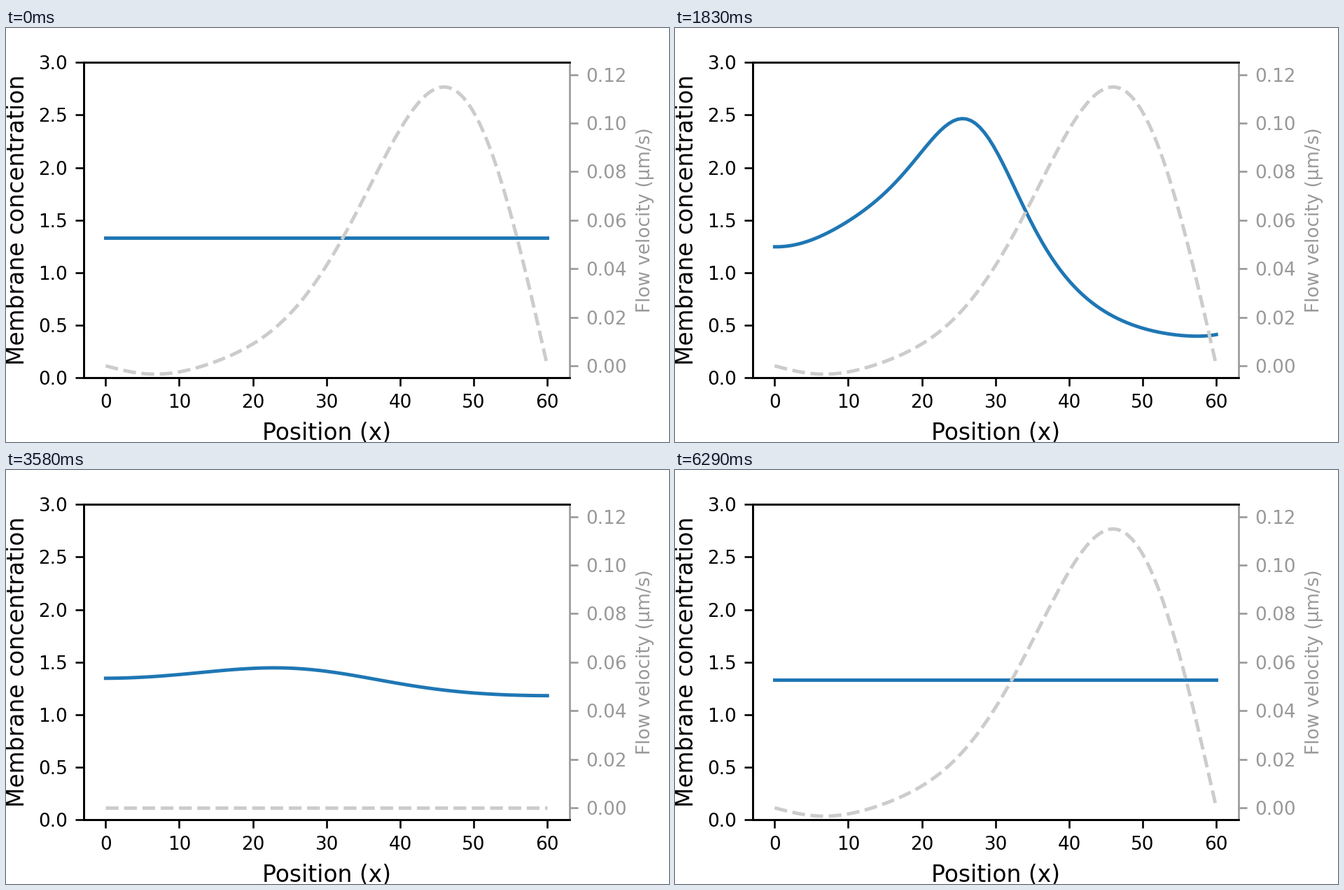
A matplotlib script for the animation above (6330 ms loop, 947 by 592 pixels).

```python
import numpy as np
import matplotlib.pyplot as plt
from matplotlib.animation import FuncAnimation

W, H = 947, 592
DPI = W / 4
LOOP_MS, FRAMES = 6330, 152

# Exchange, diffusion and flow on a 60 µm membrane with a shared cytoplasm
LENGTH, N = 60, 100
D, K_OFF, PSI, REST = 0.1, 0.005, 0.174, 4 / 3
K_ON = K_OFF * REST / (1 - PSI * REST)
SECONDS_PER_FRAME, DT = 10, 0.5
FLOW_END = 500

x = np.linspace(0, LENGTH, N)
dx = x[1] - x[0]


def flow_profile():
    """Flow speed in µm/s as a sine series, zero at both ends."""
    modes = [61.5, -56.4, 20.2, -5.35, -0.2, -0.12, -0.24]
    return sum(b * np.sin(n * np.pi * x / LENGTH)
               for n, b in enumerate(modes, 1)) / 1000


def step(conc, v):
    """One Euler step; the flow carries material to the left."""
    c = np.pad(conc, 1, mode="edge")
    flux = np.pad(v * conc, 1, mode="edge")
    diffusion = D * (c[2:] - 2 * conc + c[:-2]) / dx**2
    advection = (flux[2:] - flux[:-2]) / (2 * dx)
    exchange = K_ON * (1 - PSI * conc.mean()) - K_OFF * conc
    return conc + DT * (diffusion + advection + exchange)


def simulate():
    """All states of the loop; the last one returns to the start."""
    flow, still = flow_profile(), np.zeros(N)
    conc = np.full(N, REST)
    states = []
    for i in range(FRAMES - 1):
        v = flow if i * SECONDS_PER_FRAME < FLOW_END else still
        states.append((conc, v))
        for _ in range(int(SECONDS_PER_FRAME / DT)):
            conc = step(conc, v)
    return states + states[:1]


states = simulate()

plt.rcParams["font.family"] = "DejaVu Sans"
fig = plt.figure(figsize=(W / DPI, H / DPI), dpi=DPI, facecolor="white")
left, right, top, bottom = 110.8, 804.8, 49.2, 500.4
ax = fig.add_axes([left / W, 1 - bottom / H,
                   (right - left) / W, (bottom - top) / H])
ax.set_xlim(-3, 63)
ax.set_ylim(0, 3)
ax.set_xticks(range(0, 61, 10))
ax.set_yticks(np.arange(0, 3.1, 0.5))
ax.tick_params(labelsize=8)
ax.set_xlabel("Position (x)", fontsize=10)
ax.set_ylabel("Membrane concentration", fontsize=10)
ax.spines["right"].set_visible(False)
conc_line, = ax.plot(x, states[0][0], color="tab:blue", lw=1.5)

GREY = "0.6"
ax2 = ax.twinx()
ax2.set_xlim(-3, 63)
ax2.set_ylim(-0.005, 0.125)
ax2.set_yticks(np.arange(0, 0.121, 0.02))
ax2.tick_params(axis="y", labelsize=8, colors=GREY)
ax2.set_ylabel("Flow velocity (µm/s)", fontsize=8, color=GREY)
ax2.spines["right"].set_color(GREY)
flow_line, = ax2.plot(x, states[0][1], color="0.8", lw=1.5, ls="--")


def update(i):
    conc, v = states[i]
    conc_line.set_ydata(conc)
    flow_line.set_ydata(v)
    return conc_line, flow_line


anim = FuncAnimation(fig, update, frames=FRAMES, interval=LOOP_MS / FRAMES,
                     repeat=True, repeat_delay=0, blit=False)
plt.show()
```
